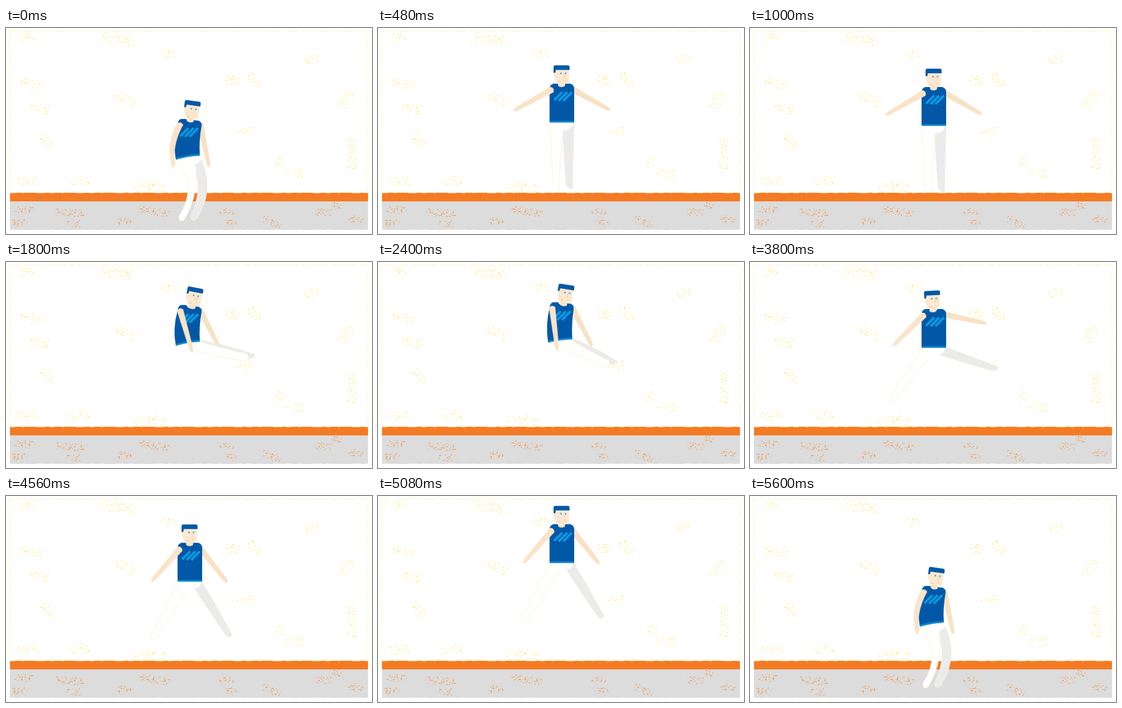
Recreate the animation shown at these times as an HTML page without scripts. Size 640x360 px, loop 5640 ms.

```html
<!DOCTYPE html>
<html lang="en">
<head>
<meta charset="utf-8">
<title>Trampoline jumps</title>
<style>
html, body { margin: 0; width: 100%; height: 100%; overflow: hidden; background: #fff; }
svg { display: block; width: 640px; height: 360px; }
.move { animation: 5640ms ease-in-out infinite; }
.body { animation-name: bounce; }
.head { animation-name: nod; transform-origin: 321px 86px; }
.shirt { animation-name: shirt; fill: #0258a6; }
.hem { animation-name: hem; fill: none; stroke: #0f88d2; stroke-width: 3; }
.stripes { animation-name: stripes; fill: none; stroke: #0a9be2; stroke-width: 4; }
.arm { fill: #f9e4c9; }
.arm.l { animation-name: swing-l, elbow; }
.arm.r { animation-name: swing-r; fill: #f7e2c5; }
.leg { stroke: #f6f0cf; stroke-width: .8; }
.leg.l { animation-name: leg-l; fill: #fff; }
.leg.r { animation-name: leg-r; fill: #ebebec; }

/* Four bounces: springy contact with the bed, then free flight */
@keyframes bounce {
  0%, 25%, 50%, 75%, 100% { transform: translateY(76px); animation-timing-function: cubic-bezier(.333, 0, .667, .333); }
  3.25%, 21.75% { transform: translateY(50px); animation-timing-function: cubic-bezier(.333, .667, .667, 1); }
  28.25%, 46.75% { transform: translateY(40px); animation-timing-function: cubic-bezier(.333, .667, .667, 1); }
  53.25%, 71.75% { transform: translateY(48px); animation-timing-function: cubic-bezier(.333, .667, .667, 1); }
  78.25%, 96.75% { transform: translateY(36px); animation-timing-function: cubic-bezier(.333, .667, .667, 1); }
  12.5% { transform: translateY(7.4px); animation-timing-function: cubic-bezier(.333, 0, .667, .333); }
  37.5% { transform: translateY(-35px); animation-timing-function: cubic-bezier(.333, 0, .667, .333); }
  62.5% { transform: translateY(-18.5px); animation-timing-function: cubic-bezier(.333, 0, .667, .333); }
  87.5% { transform: translateY(-38.6px); animation-timing-function: cubic-bezier(.333, 0, .667, .333); }
}
@keyframes nod {
  0%, 25%, 50%, 75%, 99.3%, 100% { transform: translate(1px, 1px) rotate(8deg); }
  3.2%, 21.5%, 28%, 46.5%, 53.1%, 71.8%, 78%, 96% { transform: translate(0, 0) rotate(0deg); }
  31.9%, 41% { transform: translate(4px, 2px) rotate(11deg); }
  58%, 67.4% { transform: translate(-1px, 0) rotate(-3deg); }
}
@keyframes shirt {
  0%, 25%, 31.9%, 41%, 50%, 75%, 99.3%, 100% {
    d: path("M300 93Q301 84 306 83L315 83Q321 93 328 85L337 86Q343 89 342 95Q337 122 339 147Q318 148 297 154Q291 124 300 93Z");
  }
  3.2%, 21.5%, 28%, 46.5%, 53.1%, 71.8%, 78%, 96% {
    d: path("M300 90Q301 83 307 82L314 82Q321 92 328 82L336 82Q343 84 343 91Q343 120 343 150Q321 150 300 150Q300 120 300 90Z");
  }
}
@keyframes hem {
  0%, 25%, 31.9%, 41%, 50%, 75%, 99.3%, 100% { d: path("M297 152.5Q318 146.5 339 145.5"); }
  3.2%, 21.5%, 28%, 46.5%, 53.1%, 71.8%, 78%, 96% { d: path("M300 148.5Q321 148.5 343 148.5"); }
}
@keyframes stripes {
  0%, 25%, 31.9%, 41%, 50%, 75%, 99.3%, 100% { transform: translate(-3px, 2px); }
  3.2%, 21.5%, 28%, 46.5%, 53.1%, 71.8%, 78%, 96% { transform: translate(0, 0); }
}
@keyframes swing-l {
  0%, 25%, 50%, 75%, 99.3%, 100% { transform: rotate(10deg); }
  5% { transform: rotate(45deg); }
  11% { transform: rotate(70deg); }
  17.7% { transform: rotate(60deg); }
  22%, 28.5%, 46%, 72%, 95% { transform: rotate(28deg); }
  31.9%, 41% { transform: rotate(-16deg); }
  53.2% { transform: rotate(38deg); }
  58% { transform: rotate(48deg); }
  67.4% { transform: rotate(45deg); }
  78% { transform: rotate(35deg); }
  80.9%, 90% { transform: rotate(41deg); }
}
@keyframes swing-r {
  0%, 25%, 50%, 75%, 99.3%, 100% { transform: rotate(-12deg); }
  5% { transform: rotate(-45deg); }
  11% { transform: rotate(-70deg); }
  17.7% { transform: rotate(-60deg); }
  22%, 28.5%, 46%, 95% { transform: rotate(-28deg); }
  31.9%, 41% { transform: rotate(-27deg); }
  53.2% { transform: rotate(-59deg); }
  58%, 67.4% { transform: rotate(-78deg); }
  72% { transform: rotate(-45deg); }
  78% { transform: rotate(-33deg); }
  80.9%, 90% { transform: rotate(-38.5deg); }
}
@keyframes elbow {
  0%, 25%, 50%, 75%, 99.3%, 100% { d: path("M-5 0Q-18 38 -3 69Q-2 77 1 77Q4 74 4 68Q-7 38 6 0Q0 -6 -5 0Z"); }
  3.2%, 21.5%, 28%, 46.5%, 53.1%, 71.8%, 78%, 96% { d: path("M-5 0Q-4 38 -3 69Q-2 77 1 77Q4 74 4 68Q5 38 6 0Q0 -6 -5 0Z"); }
}
@keyframes leg-l {
  0%, 25%, 50%, 75%, 99.3%, 100% { d: path("M300 153Q335 205 302 253Q302 266 312 259Q340 212 330 153Z"); }
  3.2%, 21.5%, 28.2%, 46.5%, 71.8%, 78%, 96% { d: path("M301 150Q303 210 306 260Q310 268 317 266Q318 210 325 150Z"); }
  31.9%, 41% { d: path("M304 158Q360 172 414 181Q430 180 421 168Q380 160 335 145Z"); }
  53.2% { d: path("M301 150Q301 205 301 255Q305 268 312 262Q314 210 325 150Z"); }
  58%, 67.4% { d: path("M301 150Q272 195 246 234Q245 250 254 243Q283 200 325 155Z"); }
  80.9%, 91% { d: path("M301 150Q277 197 254 243Q252 255 262 251Q290 206 325 150Z"); }
}
@keyframes leg-r {
  0%, 25%, 50%, 75%, 99.3%, 100% { d: path("M325 155Q348 205 322 253Q324 266 334 257Q367 205 339 148Z"); }
  3.2%, 21.5%, 28.2%, 46.5%, 71.8%, 78%, 96% { d: path("M322 150Q325 210 329 258Q333 267 340 266Q341 210 343 150Z"); }
  31.9%, 41% { d: path("M322 160Q372 170 420 178Q440 174 434 169Q390 153 341 145Z"); }
  53.2% { d: path("M322 150Q330 205 340 256Q346 266 351 257Q346 200 343 150Z"); }
  58%, 67.4% { d: path("M330 162Q380 178 424 190Q436 190 433 183Q390 166 343 149Z"); }
  80.9%, 91% { d: path("M322 150Q354 200 384 243Q392 251 395 242Q372 200 343 150Z"); }
}
</style>
</head>
<body>
<svg viewBox="0 0 640 360">
  <defs>
    <!-- Grainy specks, kept only where the filtered strokes lie -->
    <filter id="dust" filterUnits="userSpaceOnUse" x="0" y="0" width="640" height="360" color-interpolation-filters="sRGB">
      <feTurbulence type="fractalNoise" baseFrequency=".3 .45" numOctaves="2" seed="7"/>
      <feColorMatrix values="0 0 0 0 1  0 0 0 0 .9  0 0 0 0 .42  12 0 0 0 -7.5"/>
      <feComposite in2="SourceGraphic" operator="in"/>
    </filter>
    <filter id="grit" filterUnits="userSpaceOnUse" x="0" y="280" width="640" height="80" color-interpolation-filters="sRGB">
      <feTurbulence type="fractalNoise" baseFrequency=".3 .45" numOctaves="2" seed="3"/>
      <feColorMatrix values="0 0 0 0 .95  0 0 0 0 .62  0 0 0 0 .34  12 0 0 0 -7.1"/>
      <feComposite in2="SourceGraphic" operator="in"/>
    </filter>
  </defs>

  <rect width="640" height="360" fill="#fff"/>
  <g filter="url(#dust)" fill="none" stroke="#000" stroke-linecap="round" stroke-width="18">
    <path d="M30 18h12M168 16l50 8M280 46h10M34 96l24 4M50 142h20M66 190l8 14M196 119l28 12M388 92h12M430 86l10 8M602 118l-14 16M604 200l2 45M475 235h8M496 256h18M28 268h20M112 266h30M230 277h40M412 182h14M530 55h10"/>
  </g>
  <rect x="6.5" y="5.5" width="626.500" height="282" fill="none" stroke="#fcf3bd" stroke-dasharray="14 3 5 2 23 4"/>

  <rect x="7" y="303" width="626" height="50" fill="#dcdcdc"/>
  <rect x="7" y="288" width="626" height="15" fill="#f47b24"/>
  <path d="M7 288h626M7 353h626" stroke="#fff" stroke-dasharray="9 12 4 21 15 8"/>
  <g filter="url(#grit)" fill="none" stroke="#000" stroke-linecap="round" stroke-width="13">
    <path d="M20 318h24M16 341h16M90 322l42 2M112 342h16M200 338h14M238 318l44 6M380 322h12M388 341h10M452 334l22 10M546 322h18M574 309h8M604 334h14"/>
  </g>

  <g class="move body">
    <g transform="translate(339 92)">
      <path class="move arm r" d="M-5 0Q-4 38 -3 69Q-2 77 1 77Q4 74 4 68Q5 38 6 0Q0 -6 -5 0Z"/>
    </g>
    <path class="move leg r" d="M322 150Q325 210 329 258Q333 267 340 266Q341 210 343 150Z"/>
    <path class="move leg l" d="M301 150Q303 210 306 260Q310 268 317 266Q318 210 325 150Z"/>
    <ellipse cx="321" cy="151" rx="20" ry="13" fill="#fff"/>
    <path class="move shirt" d="M300 90Q301 83 307 82L314 82Q321 92 328 82L336 82Q343 84 343 91Q343 120 343 150Q321 150 300 150Q300 120 300 90Z"/>
    <path class="move hem" d="M300 148.5Q321 148.5 343 148.5"/>
    <path class="move stripes" d="M308 111L322 97M316 112L331 97M324 112L339 97"/>
    <g class="move head">
      <path d="M315 74h12v12q-6 4-12 0z" fill="#f9e4c9"/>
      <path d="M309 55h25v20q0 6-6 6h-12q-5 0-6-8q-4-2-2-8z" fill="#fbe8d0"/>
      <path d="M307 63V53q0-3 3-3h22q3 0 3 3v5h-24l-1 5z" fill="#0258a6"/>
      <path d="M314 78h6" stroke="#eebd8d"/>
      <path d="M325 65l1 6h-2M325 76h4" fill="none" stroke="#efc9a2" stroke-width=".9"/>
      <circle cx="320" cy="64" r="1.4" fill="#32a4dc"/>
      <circle cx="328" cy="64" r="1.4" fill="#32a4dc"/>
    </g>
    <g transform="translate(304 92)">
      <path class="move arm l" d="M-5 0Q-4 38 -3 69Q-2 77 1 77Q4 74 4 68Q5 38 6 0Q0 -6 -5 0Z"/>
    </g>
  </g>
</svg>
</body>
</html>
```
